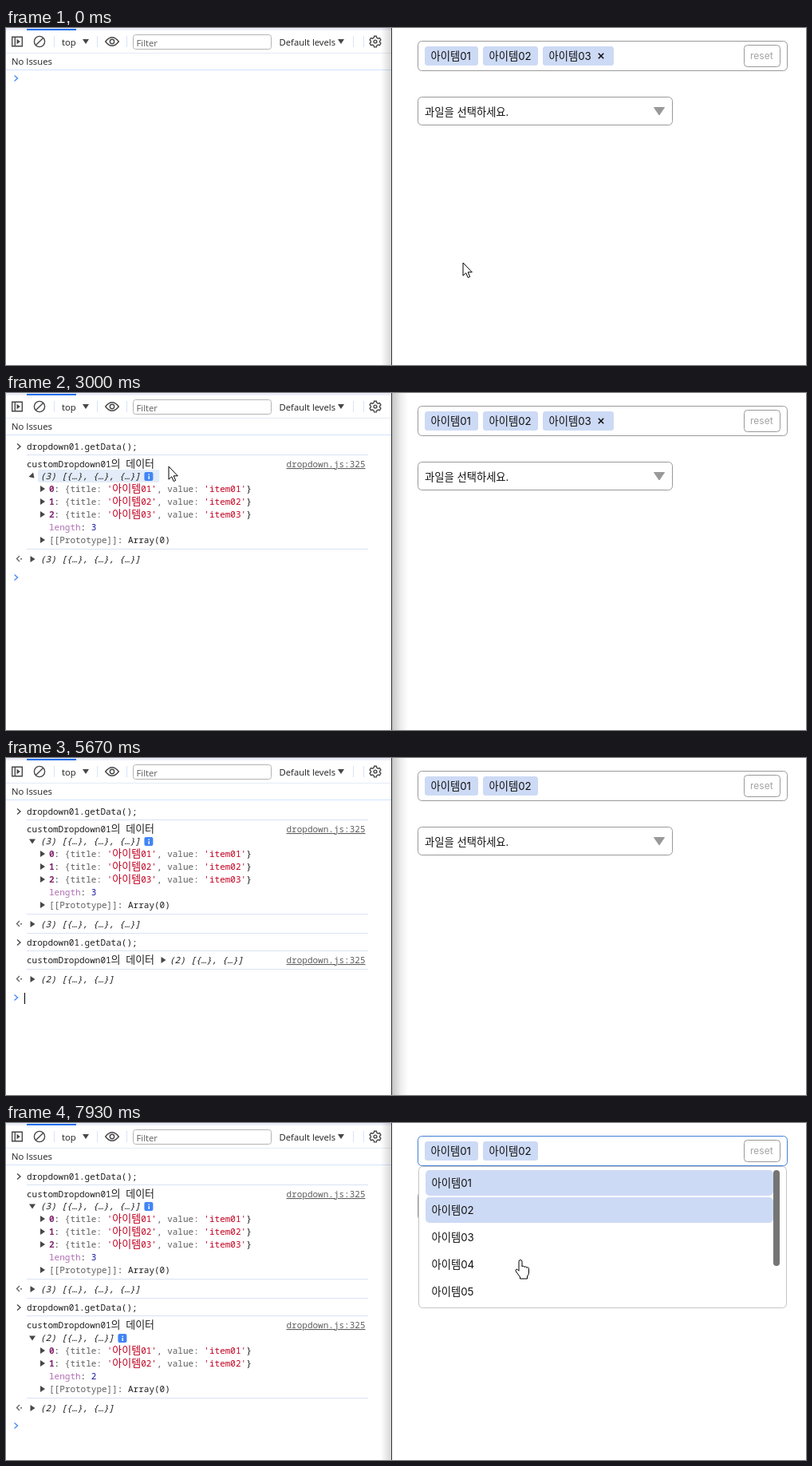
These frames come from a looping animation (1003 by 422 pixels, 8000 ms). An HTML page:

```html
<!DOCTYPE html>
<html lang="ko">
<head>
<meta charset="utf-8">
<title>Dropdown demo</title>
<style>
html, body { margin: 0; width: 100%; height: 100%; overflow: hidden; background: #fff; }
svg { display: block; width: 100%; height: 100%; }
text { white-space: pre; }
.ui { font: 11.3px "Open Sans", "Noto Sans", sans-serif; fill: #1f1f1f; }
.mono { font: 11px "Noto Sans Mono", "Liberation Mono", monospace; fill: #1f1f1f; }
.ko { font: 13px "Noto Sans CJK KR", "Noto Sans CJK JP", sans-serif; }
.page { font: 13.3px Inter, "Noto Sans CJK KR", "Noto Sans CJK JP", sans-serif; fill: #111; }
.it { font-style: italic; }
.idx { font-weight: bold; fill: #80256f; }
.dim { fill: #5e5e5e; }
.len { fill: #b06fb4; }
.num { fill: #1a1aa6; }
.str { fill: #c00020; }
.link { fill: #5e5e5e; text-decoration: underline; }
.icon { fill: none; stroke: #474747; stroke-width: 1.4; }
.solid { fill: #474747; }
.field { fill: #fff; stroke: #999; }
</style>
</head>
<body>
<svg viewBox="0 0 1003 422">
  <defs>
    <linearGradient id="toRight">
      <stop offset="0" stop-opacity=".23"/><stop offset=".5" stop-opacity=".08"/><stop offset="1" stop-opacity="0"/>
    </linearGradient>
    <linearGradient id="toLeft">
      <stop offset="0" stop-opacity="0"/><stop offset="1" stop-opacity=".16"/>
    </linearGradient>
  </defs>
  <rect width="483" height="3" fill="#eceff9"/>
  <rect x="26" y="1" width="62" height="2" fill="#1a6ce8"/>
  <path d="M0 31.5H483" stroke="#e4eaf6"/>
  <path d="M0 52.5H483" stroke="#d3e3fd"/>
  <path d="M60.5 10V24M114.5 10V24M151.5 10V24M435.5 10V24M448.5 10V24" stroke="#d8e3f8"/>
  <g class="icon">
    <path d="M7.7 11.2H20.3V22.8H7.7ZM11.3 11V23"/>
    <circle cx="42" cy="17" r="6.6"/><path d="M37.4 21.6L46.6 12.4"/>
    <path d="M124.7 17Q133 6.5 141.3 17Q133 27.5 124.7 17Z"/><circle cx="133" cy="17" r="2.7"/>
    <path d="M461.6 10.3h2.8l.5 2 1.6.9 2-.6 1.4 2.4-1.4 1.5v1.2l1.4 1.5-1.4 2.4-2-.6-1.6.9-.5 2h-2.8l-.5-2-1.6-.9-2 .6-1.4-2.4 1.4-1.5v-1.2l-1.4-1.5 1.4-2.4 2 .6 1.6-.9Z"/>
    <circle cx="463" cy="17" r="1.9"/>
  </g>
  <path class="solid" d="M13.5 13.8L17.8 17L13.5 20.2ZM96 14H104L100 20ZM416 14H424L420 20Z"/>
  <rect x="159.5" y="8.5" width="173" height="18" rx="3" fill="#fff" stroke="#b4b4b4"/>
  <g class="ui">
    <text x="70" y="22">top</text>
    <text x="163.5" y="23" fill="#5e5e5e">Filter</text>
    <text x="342.5" y="22">Default levels</text>
    <text x="7" y="46">No Issues</text>
  </g>
  <g id="scene"></g>
</svg>
<script>
const LOOP = 8000;
const COMMAND = 'dropdown01.getData();';
const CELL = 6.6;
const BLUE = '#cddaf5';

// Steps (15 per second) at which things happen.
const FOCUS1 = 16, TYPE1 = 23, RUN1 = 35, OPEN1 = 44, REMOVE = 69;
const FOCUS2 = 80, RECALL = 82, RUN2 = 84, OPEN2 = 98, LIST = 112;

// Pointer path: step, x, y.
const PATH = [
  [0, 573, 294], [1, 590, 284], [4, 740, 130], [6, 888, 42], [8, 760, 44],
  [10, 560, 62], [13, 215, 78], [17, 127, 73], [22, 127, 73],
  [37, 150, 84], [42, 200, 90], [45, 204, 92], [50, 204, 94], [54, 190, 128],
  [57, 290, 112], [60, 720, 50], [62, 946, 27], [63, 946, 28], [66, 790, 36],
  [68, 746, 36], [71, 738, 43], [73, 738, 43], [79, 125, 231], [82, 125, 231],
  [87, 288, 284], [91, 200, 252], [97, 201, 253], [100, 199, 283],
  [104, 199, 300], [105, 199, 300], [111, 640, 40], [113, 650, 45],
  [118, 658, 138], [119, 645, 172]
];

const POINTERS = {
  arrow: '<path d="M0 0V16.2L3.7 12.8L6.3 18.6L8.7 17.5L6.2 11.8H11.3Z" fill="#fff" stroke="#000"/>',
  hand: '<path d="M-2 13V1.5a2 2 0 0 1 4 0V8a1.6 1.6 0 0 1 3 .6a1.5 1.5 0 0 1 2.8 .8a1.5 1.5 0 0 1 2.7 1V15q0 3-2 5V23H-.5V21L-5.5 14q-1.2-2 .3-2.8q1.3-.5 3.2 2Z" fill="#fff" stroke="#000"/>',
  beam: '<path d="M-3-7.5h2.5M.5-7.5h2.5M0-7V7M-3 7.5h2.5M.5 7.5h2.5" fill="none" stroke="#000" stroke-width="1.1"/>'
};

const within = (v, from, to) => v >= from && v < to;
const inBox = (p, x, y, x2, y2) => within(p.x, x, x2) && within(p.y, y, y2);

const ko = s => s.replace(/[가-힣]+/g, '<tspan class="ko">$&</tspan>');
const text = (x, y, s, cls = 'mono') => `<text class="${cls}" x="${x}" y="${y}">${s}</text>`;
const mono = (x, y, s, cls = '') => text(x, Math.round(y) + 4, ko(s), 'mono ' + cls);
const span = (cls, s) => `<tspan class="${cls}">${s}</tspan>`;
const rect = (x, y, w, h, rx, fill, extra = '') =>
  `<rect x="${x}" y="${y}" width="${w}" height="${h}" rx="${rx}" fill="${fill}" ${extra}/>`;
const rule = y => `<path d="M26 ${Math.round(y) + .5}H454" stroke="#d9e3f3"/>`;
const twisty = (x, y, angle = 0) =>
  `<path class="solid" d="M-2.5-4L3.5 0L-2.5 4Z" transform="translate(${x} ${Math.round(y)}) rotate(${angle})"/>`;
const chevron = (x, y, color) =>
  `<path d="M${x} ${y - 3.5}l4 3.5l-4 3.5" fill="none" stroke="${color}" stroke-width="1.4"/>`;

function pointerAt(step) {
  const i = Math.max(1, PATH.findIndex(p => p[0] >= step));
  const [s0, x0, y0] = PATH[i - 1], [s1, x1, y1] = PATH[i];
  const f = (step - s0) / (s1 - s0);
  return { x: Math.round(x0 + (x1 - x0) * f), y: Math.round(y0 + (y1 - y0) * f) };
}

function pointerKind(p, promptY, listOpen) {
  if (inBox(p, 516, 16, 980, 54)) return 'hand';
  if (listOpen ? inBox(p, 517, 54, 979, 232) : inBox(p, 516, 86, 836, 122)) return 'hand';
  return p.x < 483 && Math.abs(p.y - promptY) < 11 ? 'beam' : 'arrow';
}

// One command with its log line and returned value; next is the prompt's y.
// Row heights are fractional, and each row snaps to whole pixels.
function entry(y, count, openFor, focused, p) {
  const open = openFor >= 0;
  const preview = `(${count}) [${Array(count).fill('{…}').join(', ')}]`;
  let last = y + 22;
  let out = chevron(14, Math.floor(y), '#474747') + mono(26, y, COMMAND) + rule(y + 10)
    + mono(26, last, 'customDropdown01의 데이터') + mono(351.5, last, 'dropdown.js:325', 'link');

  if (!open) {
    out += twisty(197, last) + mono(205, last, preview, 'it');
  } else {
    const head = Math.round(last + 15.4), end = 43 + preview.length * CELL;
    if (focused) out += rect(40, head - 8, end + 24 - 40, 16, 2, '#e3ecf8');
    out += twisty(33, head, Math.min(90, openFor * 45)) + mono(43, head, preview, 'it')
      + rect(end + 5, head - 5, 11, 11, 2, '#4285f4')
      + `<path d="M${end + 10.8} ${head - 2.5}v1.5m0 1v4" stroke="#fff" stroke-width="1.4"/>`;

    const rows = Array.from({ length: count }, (_, i) =>
      span('idx', i) + ': ' + span('dim', '{title: ') + span('str', `'아이템0${i + 1}'`)
      + span('dim', ', value: ') + span('str', `'item0${i + 1}'`) + '}');
    rows.push(span('len', 'length') + ': ' + span('num', count));
    rows.push(span('dim', '[[Prototype]]') + ': Array(0)');
    last += 31.4;
    rows.forEach((row, i) => {
      const cy = Math.round(last + i * 16);
      if (p.x < 308 && within(p.y, cy - 8, cy + 8)) out += rect(0, cy - 8, 308, 16, 0, '#f0f0f0');
      if (i !== count) out += twisty(45.5, cy);
      out += mono(54, cy, row);
    });
    last += (rows.length - 1) * 16;
  }

  const ret = Math.round(last + 24);
  out += rule(last + 11)
    + `<path d="M17 ${ret - 4}l-3.5 3.5l3.5 3.5" fill="none" stroke="#5e5e5e" stroke-width="1.3"/>`
    + rect(18, ret - 1.3, 2, 2, 1, '#5e5e5e')
    + twisty(33, ret) + mono(43, ret, preview, 'it');
  return { out, next: last + 47 };
}

function page(step, p) {
  const listOpen = step >= LIST;
  const hot = inBox(p, 925, 21, 971, 49);
  let out = rect(516.5, 16.5, 463, 37, 5, '#fff', `stroke="${listOpen ? '#3f7fd8' : '#999'}"`);

  const chips = [[525, 67], [598, 69], [673, 89]].slice(0, step < REMOVE ? 3 : 2);
  chips.forEach(([x, w], i) => {
    out += rect(x, 23, w, 24, 3.5, BLUE) + text(x + 7.5, 39.5, '아이템0' + (i + 1), 'page');
  });
  if (chips.length > 2) out += '<path d="M742.8 31.8l6.4 6.4m0-6.4l-6.4 6.4" stroke="#111" stroke-width="1.6"/>';

  out += rect(925.5, 21.5, 45, 27, 4, hot ? '#7aa1de' : '#fff', `stroke="${hot ? '#5f8bd0' : '#999'}"`)
    + `<text x="933" y="39" font-family="Inter, sans-serif" font-size="12" fill="${hot ? '#dbe6f7' : '#a3a3a3'}">reset</text>`
    + '<rect class="field" x="516.5" y="86.5" width="319" height="35" rx="5"/>'
    + text(525, 109.5, '과일을 선택하세요.', 'page')
    + '<path d="M812.5 99.5H825.5L819 109Z" fill="#999" stroke="#999" stroke-linejoin="round"/>';

  if (listOpen) {
    out += rect(517.5, 54.5, 461, 177, 5, '#fff', 'stroke="#c4c4c4"');
    for (let i = 0; i < 5; i++) {
      if (i < 2) out += rect(526, 59 + i * 34, 436, 32, 5, BLUE);
      out += text(533.5, 79.5 + i * 34, '아이템0' + (i + 1), 'page');
    }
    out += rect(962, 59, 8, 120, 4, '#757575');
  }
  return out;
}

function scene(step) {
  const p = pointerAt(step);
  let out = '', promptY = 63;
  const add = e => { out += e.out; promptY = e.next; };
  if (step >= RUN1) add(entry(67, 3, step - OPEN1, step < REMOVE, p));
  if (step >= RUN2) {
    out += rule(promptY - 12.5);
    add(entry(promptY, 2, step - OPEN2, false, p));
  }
  promptY = Math.floor(promptY);

  let typed = '';
  if (within(step, TYPE1, RUN1)) typed = COMMAND.slice(0, 2 * (step - TYPE1) + 1);
  if (within(step, RECALL, RUN2)) typed = COMMAND;
  out += chevron(10.5, promptY, '#4c8df6') + mono(24, promptY, typed);
  if (within(step, FOCUS1, OPEN1) || within(step, FOCUS2, 90))
    out += rect(23 + typed.length * CELL, promptY - 6, 1, 14, 0, '#000');

  out += page(step, p);

  const consoleActive = within(step, FOCUS1, REMOVE) || within(step, FOCUS2, LIST);
  out += consoleActive ? rect(484, 0, 20, 422, 0, 'url(#toRight)') : rect(470, 0, 13, 422, 0, 'url(#toLeft)');
  out += rect(483, 0, 1, 422, 0, '#303030');

  // The pointer hides while the keyboard is in use.
  if (!within(step, TYPE1, 37) && !within(step, RECALL, 87))
    out += `<g transform="translate(${p.x} ${p.y})">${POINTERS[pointerKind(p, promptY, step >= LIST)]}</g>`;
  return out;
}

const view = document.getElementById('scene');
let shown = -1;
function tick() {
  const t = performance.now() % LOOP, r = t % 200;
  const step = 3 * Math.floor(t / 200) + (r >= 130 ? 2 : r >= 70 ? 1 : 0);
  if (step !== shown) view.innerHTML = scene(shown = step);
  requestAnimationFrame(tick);
}
tick();
</script>
</body>
</html>
```
